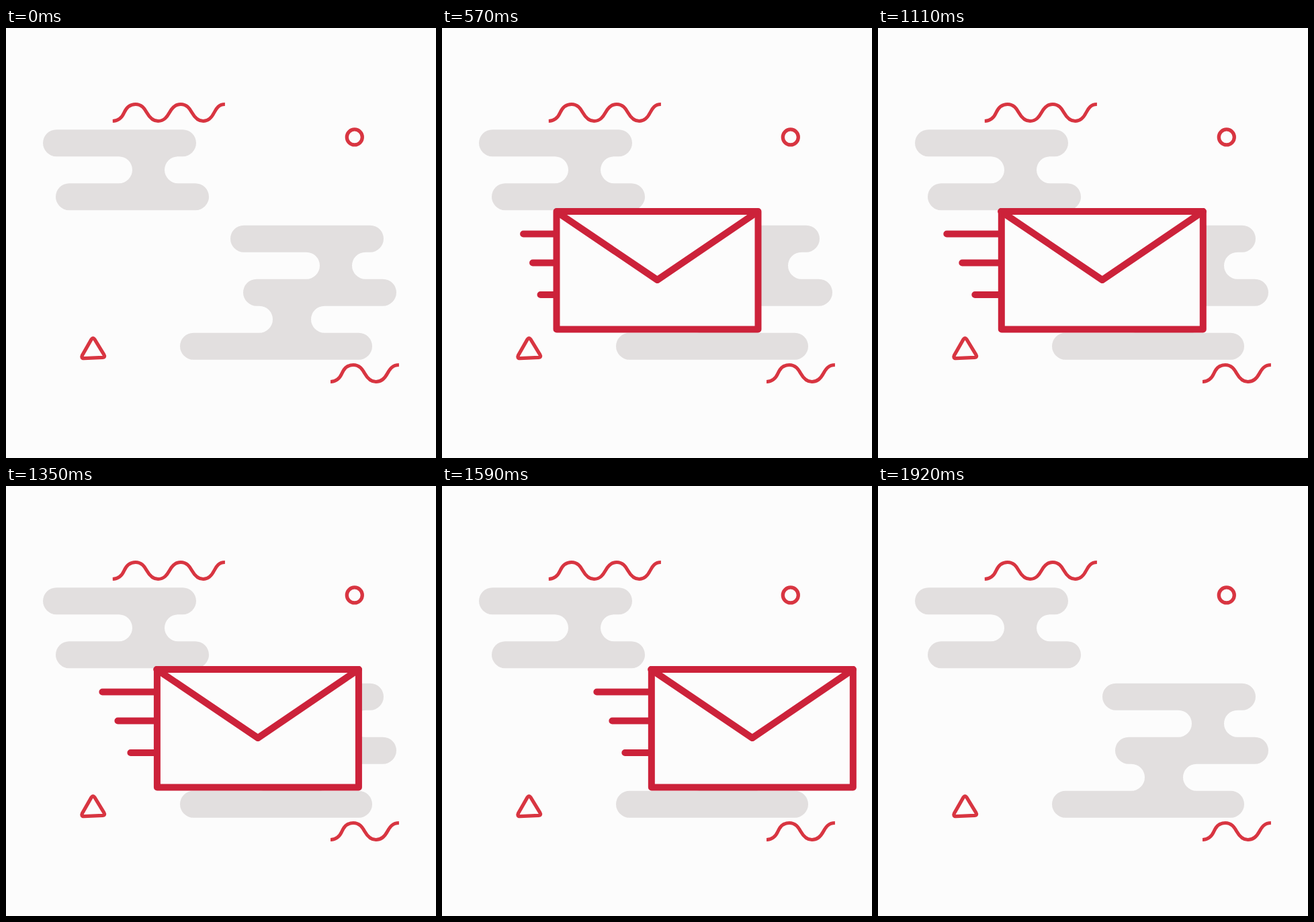
An HTML page for the animation above (2640 ms loop, 640x640 px).

```html
<!DOCTYPE html>
<html lang="en">
<head>
<meta charset="utf-8">
<title>Flying envelope</title>
<style>
  html, body { margin: 0; width: 100%; height: 100%; overflow: hidden; background: #fcfcfc; }
  svg { display: block; width: 100vw; height: 100vh; }
  .cloud { fill: #e2dfdf; }
  .deco { fill: none; stroke: #d83541; stroke-width: 5; }
  .bold { stroke-width: 5.3; }
  .mail { fill: none; stroke: #cc223a; stroke-width: 10; stroke-linecap: round; stroke-linejoin: round; }
  #box { fill: #fcfcfc; }
</style>
</head>
<body>
<svg viewBox="0 0 640 640">
  <g class="cloud">
    <path d="M75 151.2H263a20 20 0 0 1 0 40H256a20 20 0 0 0 0 40H282a20 20 0 0 1 0 40H94a20 20 0 0 1 0 -40H168a20 20 0 0 0 0 -40H75a20 20 0 0 1 0 -40z"/>
    <path d="M354 293.7H542a20 20 0 0 1 0 40H535a20 20 0 0 0 0 40H561a20 20 0 0 1 0 40H474a20 20 0 0 0 0 40H525a20 20 0 0 1 0 40H279a20 20 0 0 1 0 -40H377a20 20 0 0 0 0 -40H373a20 20 0 0 1 0 -40H447a20 20 0 0 0 0 -40H354a20 20 0 0 1 0 -40z"/>
  </g>
  <g class="deco">
    <path id="longWave"/>
    <path id="shortWave"/>
    <circle class="bold" cx="518.8" cy="162.4" r="11.5"/>
    <path class="bold" d="M127.2 463.2Q129.5 460 131.8 463.2L145.8 486.2Q148 490 144 490.4L116 491.6Q111.4 491.5 113.6 487z"/>
  </g>
  <g class="mail" id="mail">
    <path id="lines"/>
    <path id="box"/>
    <path id="flap"/>
  </g>
</svg>
<script>
const LOOP = 2640;
const L = 170.5, R = 470.5, T = 273, B = 448.5;
const MID = (L + R) / 2, APEX = 375, FLAP_L = 169.8;
const $ = id => document.getElementById(id);
const mail = $('mail'), box = $('box'), flap = $('flap'), lines = $('lines');

const span = (t, a, b) => Math.min(1, Math.max(0, (t - a) / (b - a)));
const smooth = x => x * x * (3 - 2 * x);
// cubic-bezier(1, 0, 1, 1) in closed form
const lateRush = x => smooth(1 - Math.cbrt(1 - x));

const rise = 'c10 -.3 14.2 -6 17 -12.5s8 -12.6 17 -12.6';
const down = 'c9 0 13.4 6.5 16.8 12.5s8.4 12.6 16.8 12.6';
const up = 'c9 0 13.4 -6.5 16.8 -12.5s8.4 -12.6 16.8 -12.6';
const tail = w => `c${w * .27} 0 ${w * .4} -6 ${w * .5} -12.5s${w * .22} -12.4 ${w * .5} -12.4`;
$('longWave').setAttribute('d', 'M158.8 138.5' + rise + down + up + down + tail(32.3));
$('shortWave').setAttribute('d', 'M483 526.5' + rise + down + tail(34.3));

const streaks = [[306.5, 89], [349.5, 112], [397, 131]];

// The outline grows both ways from the bottom left corner.
function boxPath(p) {
  if (p <= 0) return '';
  if (p >= 1) return `M${R} ${T}H${L}V${B}H${R}z`;
  const w = R - L, h = B - T, d = p * (w + h);
  const head = d > h ? `M${L + d - h} ${T}H${L}` : `M${L} ${B - d}`;
  const end = d > w ? `H${R}V${B - (d - w)}` : `H${L + d}`;
  return head + `V${B}` + end;
}

function flapPath(p) {
  if (p <= 0) return '';
  const y = APEX - (APEX - T) * p;
  const side = x => MID + (x - MID) * p;
  return `M${side(FLAP_L)} ${y}L${MID} ${APEX}L${side(R)} ${y}`;
}

function linePath(p) {
  if (p <= 0) return '';
  return streaks.map(([y, x]) => `M${L} ${y}H${L + (x - L) * p}`).join('');
}

function draw(t) {
  mail.style.display = t < 1920 ? '' : 'none';
  mail.setAttribute('transform', `translate(${565 * lateRush(span(t, 840, 1920))} 0)`);
  box.setAttribute('d', boxPath(smooth(span(t, 0, 492))));
  flap.setAttribute('d', flapPath(smooth(span(t, 390, 590))));
  lines.setAttribute('d', linePath(smooth(span(t, 530, 600))));
}

const start = performance.now();
function tick() {
  const t = (performance.now() - start) % LOOP;
  draw(Math.floor(t / 30) * 30);
  requestAnimationFrame(tick);
}
draw(0);
requestAnimationFrame(tick);
</script>
</body>
</html>
```
